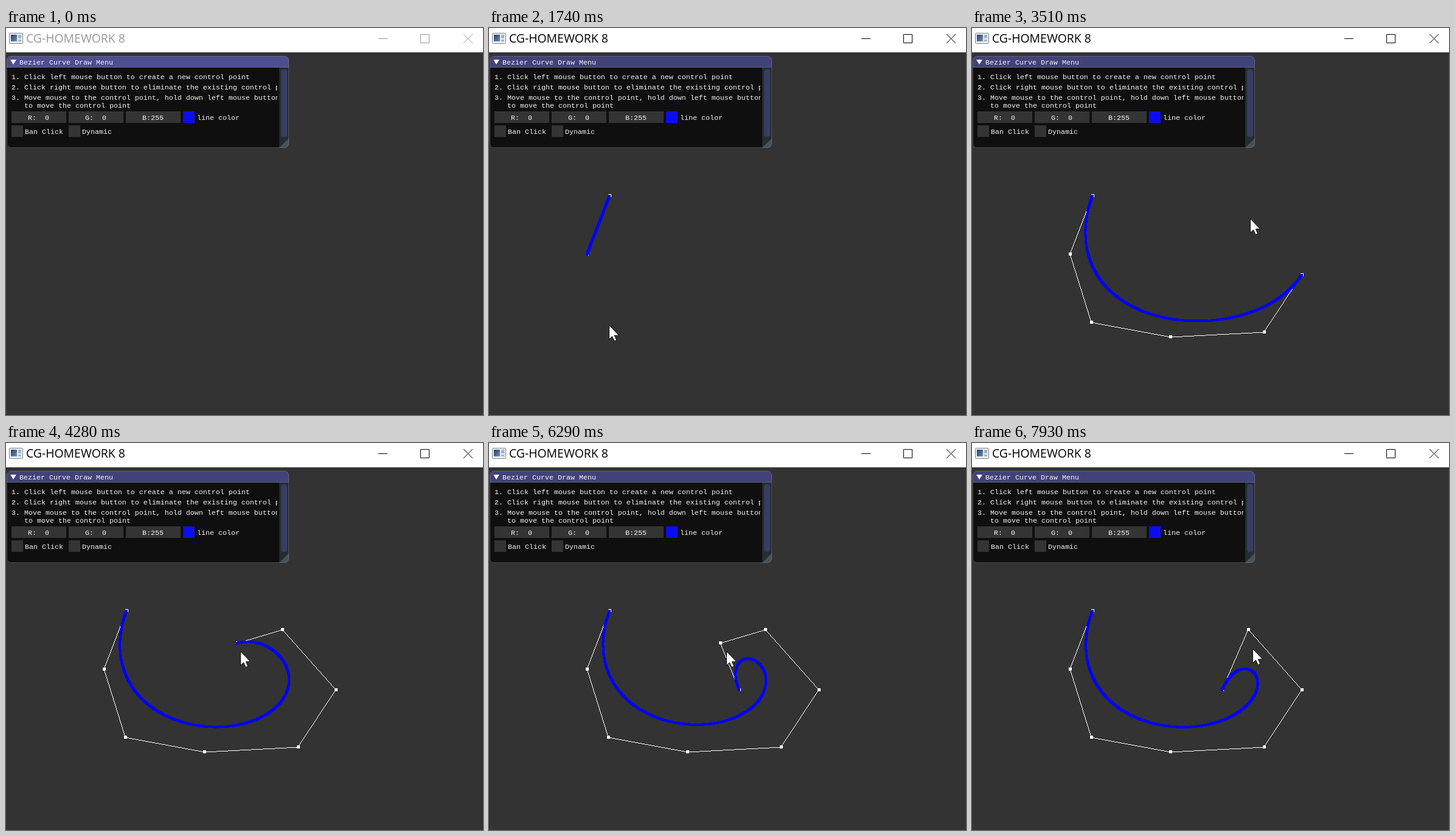
Write an HTML page with a canvas that moves like this. It is 784 px wide and 636 px high and loops after 8 s.

```html
<!DOCTYPE html>
<html lang="en">
<head>
<meta charset="utf-8">
<title>Bezier curve menu</title>
<style>
html, body { margin: 0; width: 100%; height: 100%; overflow: hidden; background: #333; }
canvas, svg { position: absolute; left: 0; top: 0; display: block; }
.title { font: 19.4px "Open Sans", sans-serif; fill: #999; }
.buttons { fill: none; stroke: #999; }
.bar { fill: #4e4e92; }
.active .title { fill: #000; }
.active .buttons { stroke: #000; }
.active .bar { fill: #42427b; }
.menu { font: 11.667px "Liberation Mono", monospace; fill: #f4f4f4; }
.field { fill: #343434; }
</style>
</head>
<body>
<canvas id="scene" width="784" height="636"></canvas>
<svg id="ui" width="784" height="636" viewBox="0 0 784 636">
  <defs>
    <clipPath id="panel"><rect x="1" y="46" width="464" height="151" rx="7"/></clipPath>
    <clipPath id="content"><rect x="1" y="66" width="445" height="130"/></clipPath>
    <linearGradient id="glass" x2="1" y2="1">
      <stop stop-color="#27406f"/><stop offset="1" stop-color="#6f8fb8"/>
    </linearGradient>
  </defs>

  <rect width="784" height="40" fill="#fff"/>
  <rect x="5.5" y="8.5" width="22" height="17" rx="1" fill="#eceff2" stroke="#7d8288"/>
  <rect x="8" y="11" width="10" height="11" fill="url(#glass)"/>
  <path d="M20 11h5v6h-5zM20 19h5v3h-5z" fill="#a9b2bd"/>
  <text class="title" x="33" y="24">CG-HOMEWORK 8</text>
  <path class="buttons" d="M612 17.5h15M681.5 10.5h14v14h-14zM752 10l15 15M767 10l-15 15"/>

  <g clip-path="url(#panel)">
    <rect x="1" y="46" width="464" height="151" fill="#0f0f0f"/>
    <rect class="bar" x="1" y="46" width="464" height="19"/>
    <rect x="449" y="65" width="16" height="132" fill="#252c34"/>
    <rect x="452" y="68" width="10" height="111" rx="4" fill="#383d62"/>
    <path d="M465 181v16h-16z" fill="#4a5057"/>
  </g>
  <rect x="1.5" y="46.5" width="463" height="150" rx="6.5" fill="none" stroke="#808080" stroke-opacity=".5"/>
  <path d="M2 64.5h462" stroke="#808080" stroke-opacity=".5"/>
  <path d="M7 52h10l-5 8z" fill="#f4f4f4"/>

  <path class="field" d="M9 137h90v19h-90zM103 137h90v19h-90zM197 137h90v19h-90zM9 160h19v19h-19zM103 160h19v19h-19z"/>
  <rect x="291" y="137" width="19" height="19" fill="#0c0cf0"/>

  <g class="menu" clip-path="url(#content)">
    <text x="9" y="84">1. Click left mouse button to create a new control point</text>
    <text x="9" y="101">2. Click right mouse button to eliminate the existing control point</text>
    <text x="9" y="118">3. Move mouse to the control point, hold down left mouse button</text>
    <text x="30" y="131">to move the control point</text>
    <text x="36" y="151">R:&#160;&#160;0</text>
    <text x="130" y="151">G:&#160;&#160;0</text>
    <text x="224" y="151">B:255</text>
    <text x="314" y="151">line color</text>
    <text x="31" y="174">Ban Click</text>
    <text x="125" y="174">Dynamic</text>
  </g>
  <text class="menu" x="22" y="60">Bezier Curve Draw Menu</text>

  <path id="cursor" d="M.5 .5V23.5L5.5 18.8L9 26.5L12.7 25L9.3 17.2H16.5Z" fill="#fff" stroke="#000" stroke-width=".9"/>
</svg>
<script>
const LOOP = 8000, TICK = 75.6, ENTER = 70, ACTIVATE = 900;

// Control points: the mouse leaves for x, y at one time and clicks at another
const points = [
  { x: 198, y: 276, leave: 70, click: 980 },
  { x: 161, y: 372, leave: 1050, click: 1440 },
  { x: 196, y: 484, leave: 1510, click: 1820 },
  { x: 326, y: 508, leave: 1910, click: 2280 },
  { x: 480, y: 500, leave: 2360, click: 2820 },
  { x: 542, y: 406, leave: 2820, click: 3200 },
  { x: 454, y: 307, leave: 3280, click: 3590 },
  { x: 380, y: 329, leave: 3750, click: 4130, removed: 6930 },
  { x: 411, y: 406, leave: 4210, click: 4740 }
];

const mix = (a, b, k) => a + (b - a) * k;
const glide = k => k * (2 - k);
const smooth = k => k * k * (3 - 2 * k);

// The mouse rests on each point before clicking; a swing is a detour out and back
const moves = [
  ...points.map(p => ({ x: p.x + 1, y: p.y + 4, leave: p.leave, arrive: mix(p.leave, p.click, 0.75) })),
  { x: 403, y: 360, leave: 5260, arrive: 6060, swing: [165, 100] },
  { x: 379, y: 328, leave: 6060, arrive: 6710 },
  { x: 461, y: 338, leave: 7000, arrive: 7930, swing: [198, 104] }
];

const ui = document.getElementById("ui");
const cursor = document.getElementById("cursor");
const ctx = document.getElementById("scene").getContext("2d");

function mouseAt(t) {
  let x = 571, y = 618;
  for (const m of moves) {
    if (t < m.leave) break;
    const k = Math.min(1, (t - m.leave) / (m.arrive - m.leave));
    const e = m.swing ? smooth(k) : glide(k);
    const [dx, dy] = m.swing || [0, 0];
    const bend = Math.sin(Math.PI * e);
    x = mix(x, m.x, e) + dx * bend;
    y = mix(y, m.y, e) + dy * bend;
  }
  return [Math.round(x), Math.round(y)];
}

function between(a, b, k) {
  return { x: mix(a.x, b.x, k), y: mix(a.y, b.y, k) };
}

function bezier(p, k) {
  while (p.length > 1) p = p.slice(1).map((q, i) => between(p[i], q, k));
  return p[0];
}

// Hard-edged square, snapped to whole pixels
function dot({ x, y }, size) {
  ctx.fillRect(Math.round(x - size / 2), Math.ceil(y - size / 2 - 0.5), size, size);
}

function line(a, b) {
  const n = Math.max(Math.abs(b.x - a.x), Math.abs(b.y - a.y));
  for (let i = 0; i <= n; i++) dot(between(a, b, i / n), 1);
}

function draw(t) {
  const live = points.filter(p => t >= p.click && !(t >= p.removed));
  ctx.clearRect(0, 0, 784, 636);
  ctx.fillStyle = "#fff";
  live.forEach((p, i) => {
    if (i) line(live[i - 1], p);
    dot(p, 5);
  });
  if (live.length > 1) {
    ctx.fillStyle = "#00f";
    for (let i = 0; i <= 800; i++) dot(bezier(live, i / 800), 4);
  }
  const step = Math.floor((t + 12) / TICK) * TICK;
  cursor.setAttribute("transform", `translate(${mouseAt(step)})`);
  cursor.style.display = t < ENTER ? "none" : "";
  ui.classList.toggle("active", t >= ACTIVATE);
}

const start = performance.now();
function tick() {
  draw((performance.now() - start) % LOOP);
  requestAnimationFrame(tick);
}
tick();
</script>
</body>
</html>
```
